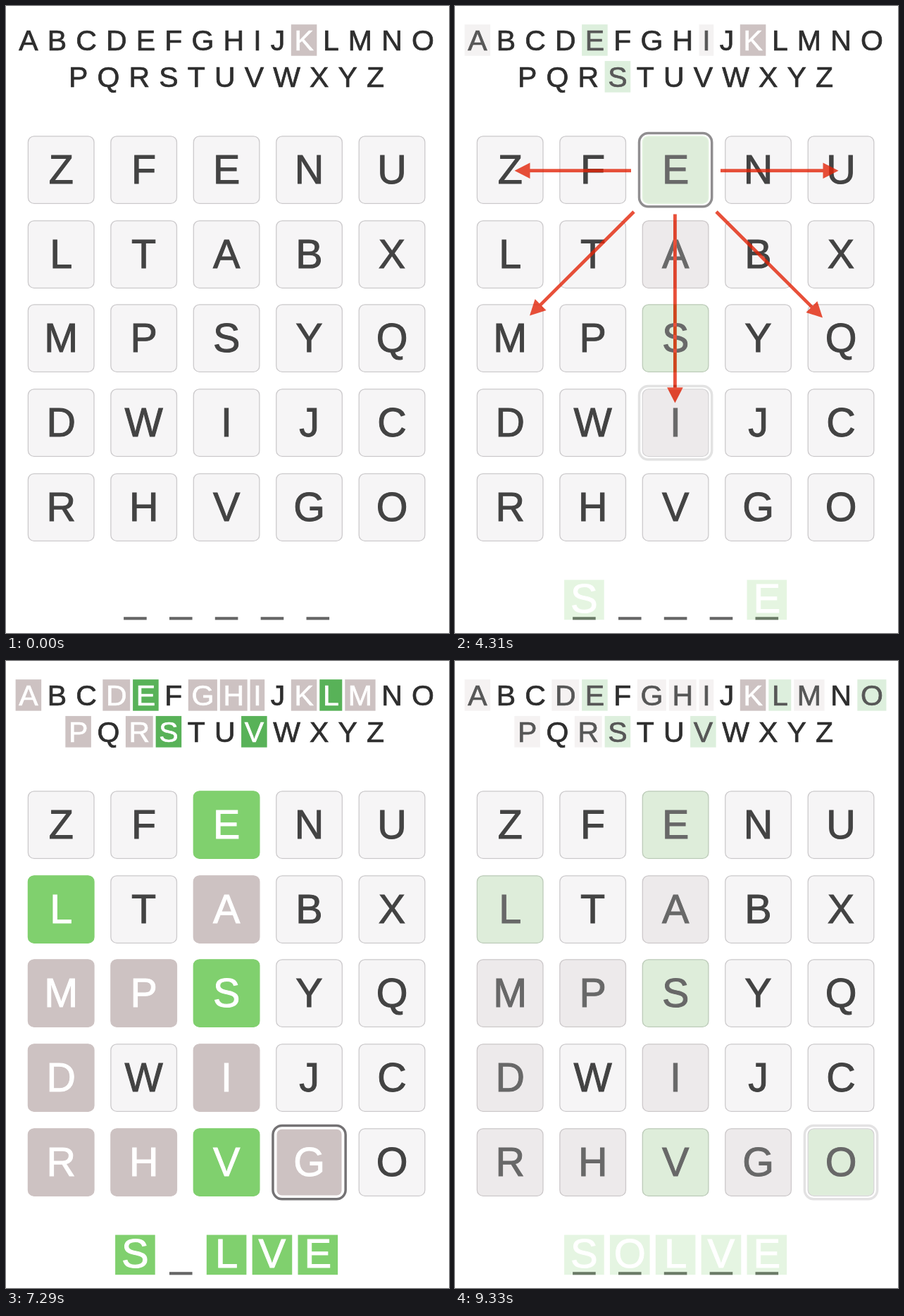
An HTML page for the animation above (9400 ms loop, 629x890 px).

```html
<!DOCTYPE html>
<html lang="en">
<head>
<meta charset="utf-8">
<title>Letter grid puzzle</title>
<style>
  html, body { margin: 0; width: 100%; height: 100%; overflow: hidden; background: #fff; }
  svg { display: block; width: 100%; height: 100%; }
  text { font-family: "Liberation Sans", Arial, sans-serif; text-anchor: middle; }
</style>
</head>
<body>
<svg id="stage" viewBox="0 0 629 890"></svg>
<script>
const NS = "http://www.w3.org/2000/svg";
const stage = document.getElementById("stage");

const LOOP = 9400, STEP = 70, STEPS = 5;
const GRID = "ZFENULTABXMPSYQDWIJCRHVGO";
const WORD = "SOLVE";
const GREEN = "#80d06e", BADGE_GREEN = "#58b258", MISS = "#cdc2c2";
const RING = "#747274", ARROW = "#e32408";

// Each scene fades in from its start time.
const scenes = [
  { at: 0, seen: "" },
  { at: 1250, seen: "", ring: "E" },
  { at: 2780, seen: "", ring: "E", arrows: true },
  { at: 4310, seen: "EASI", ring: "I" },
  { at: 5210, seen: "EASIPL", ring: "L" },
  { at: 6110, seen: "EASIPLMDR", ring: "R" },
  { at: 7010, seen: "EASIPLMDRHVG", ring: "G" },
  { at: 7910, seen: "EASIPLMDRHVGO", ring: "O" },
  { at: 9120, seen: "" }
];

function add(parent, tag, attrs, content) {
  const el = document.createElementNS(NS, tag);
  for (const key in attrs) el.setAttribute(key, attrs[key]);
  if (content) el.textContent = content;
  return parent.appendChild(el);
}

function rect(g, x, y, width, height, fill, more) {
  return add(g, "rect", { x, y, width, height, fill, ...more });
}

// A thin outline gives the letters a slightly heavier weight.
function letter(g, ch, x, y, size, fill) {
  add(g, "text", { x, y, "font-size": size, fill, stroke: fill, "stroke-width": size * 0.018 }, ch);
}

const pen = document.createElement("canvas").getContext("2d");
function advance(ch, size) {
  pen.font = size + 'px "Liberation Sans", Arial, sans-serif';
  return pen.measureText(ch).width;
}

function drawAlphabet(g, letters, baseline, seen) {
  const size = 41, pad = 4.6, gap = 3.95;
  const widths = [...letters].map(ch => advance(ch, size) + 2 * pad);
  const total = widths.reduce((a, b) => a + b, gap * (letters.length - 1));
  let x = 313 - total / 2;
  [...letters].forEach((ch, i) => {
    const marked = ch === "K" || seen.includes(ch);
    if (marked) rect(g, x, baseline - 37.1, widths[i], 44.5, WORD.includes(ch) ? BADGE_GREEN : MISS);
    letter(g, ch, x + widths[i] / 2, baseline, size, marked ? "#fff" : "#2e2e2e");
    x += widths[i] + gap;
  });
}

function drawTile(g, ch, i, { seen, ring }) {
  const cx = 78.2 + (i % 5) * 117.45;
  const cy = Math.floor(232.5 + Math.floor(i / 5) * 119.7) + 0.5;
  const marked = seen.includes(ch);
  const fill = !marked ? "#f6f5f6" : WORD.includes(ch) ? GREEN : MISS;
  if (ch === ring) {
    rect(g, cx - 51.6, cy - 52.1, 103.2, 104.4, "#fff", { rx: 13, stroke: RING, "stroke-width": 3.5 });
    rect(g, cx - 46, cy - 46.8, 92, 93.8, fill, { rx: 7 });
  } else {
    rect(g, cx - 46.8, cy - 47.7, 93.6, 95.6, fill,
      { rx: 8.5, stroke: marked ? fill : "#cccacc", "stroke-width": 1.3 });
  }
  letter(g, ch, cx, cy + 19.4, 57.5, marked ? "#fff" : "#434343");
}

function drawArrow(g, x1, y1, x2, y2) {
  const length = Math.hypot(x2 - x1, y2 - y1);
  const angle = Math.atan2(y2 - y1, x2 - x1) * 180 / Math.PI;
  const a = add(g, "g", { transform: `translate(${x1} ${y1}) rotate(${angle})`, fill: ARROW });
  rect(a, 0, -2.4, length - 20, 4.8, ARROW);
  add(a, "path", { d: `M${length} 0l-22 -11.3v22.6z` });
}

function drawWord(g, seen) {
  [...WORD].forEach((ch, i) => {
    const cx = 183.4 + i * 64.85;
    if (seen.includes(ch)) {
      rect(g, cx - 28.3, 814.6, 56.6, 56.6, GREEN);
      letter(g, ch, cx, 860.5, 58, "#fff");
    } else {
      rect(g, cx - 16.3, 867.2, 32.6, 4.2, "#666");
    }
  });
}

function buildScene(scene) {
  const g = add(stage, "g", {});
  rect(g, 0, 0, 629, 890, "#fff");
  drawAlphabet(g, "ABCDEFGHIJKLMNO", 63.3, scene.seen);
  drawAlphabet(g, "PQRSTUVWXYZ", 115.2, scene.seen);
  [...GRID].forEach((ch, i) => drawTile(g, ch, i, scene));
  if (scene.arrows) {
    drawArrow(g, 250, 233.7, 84.5, 233.7);
    drawArrow(g, 377, 233.7, 544.5, 233.7);
    drawArrow(g, 312.4, 295.5, 312.4, 563.5);
    drawArrow(g, 254, 292, 106, 439.5);
    drawArrow(g, 371, 292, 522, 442.5);
  }
  drawWord(g, scene.seen);
  return g;
}

const layers = scenes.map(buildScene);

function update(time) {
  const t = time % LOOP;
  let current = 0;
  while (current + 1 < scenes.length && scenes[current + 1].at <= t) current++;
  const step = Math.floor((t - scenes[current].at) / STEP) + 1;
  const mix = current ? Math.min(1, step / STEPS) : 1;
  layers.forEach((layer, i) => {
    const visible = i === current || (i === current - 1 && mix < 1);
    layer.setAttribute("display", visible ? "inline" : "none");
    layer.setAttribute("opacity", i === current ? mix : 1);
  });
}

const start = performance.now();
function tick() {
  update(performance.now() - start);
  requestAnimationFrame(tick);
}
tick();
</script>
</body>
</html>
```
